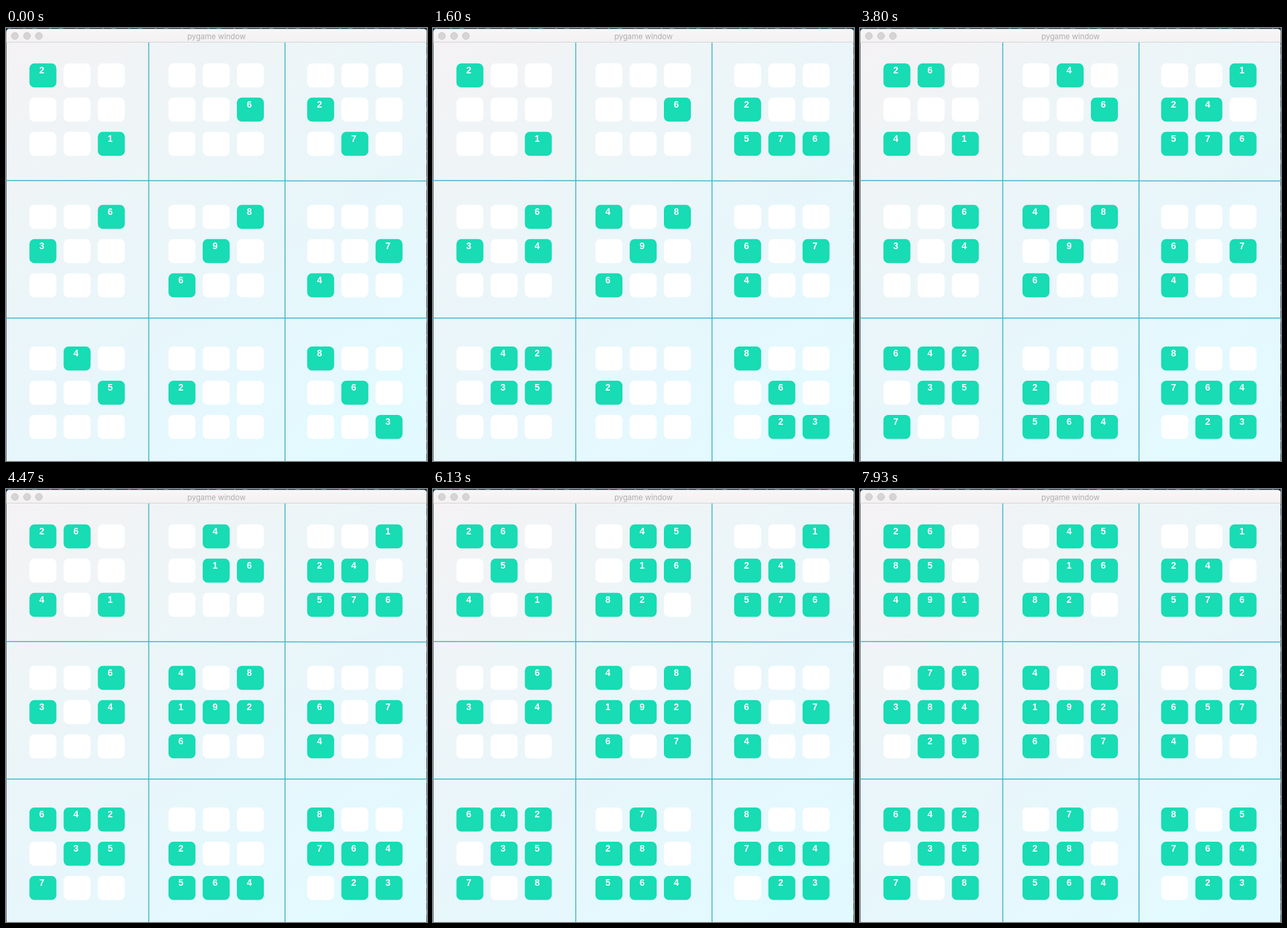
An HTML page that plays this animation: 640x658 px, repeating every 8 s.

```html
<!DOCTYPE html>
<html lang="en">
<head>
<meta charset="utf-8">
<title>Sudoku solver</title>
<style>
  html, body { margin: 0; width: 100%; height: 100%; overflow: hidden; background: #0d2433; }
  svg { display: block; width: 640px; height: 658px; }
  .title { font: 11.5px Inter, sans-serif; fill: #b0adaf; text-anchor: middle; }
  .digit { font: bold 14px "Liberation Sans", Arial, sans-serif; fill: #fff; text-anchor: middle; }
</style>
</head>
<body>
<svg id="stage" viewBox="0 0 640 658" xmlns="http://www.w3.org/2000/svg">
  <defs>
    <linearGradient id="sky" gradientUnits="userSpaceOnUse" x1="60" y1="0" x2="500" y2="658">
      <stop offset="0" stop-color="#f4f2f4"/>
      <stop offset=".3" stop-color="#edf5f7"/>
      <stop offset=".6" stop-color="#e8f6fb"/>
      <stop offset="1" stop-color="#e2faff"/>
    </linearGradient>
    <linearGradient id="bar" x1="0" y1="0" x2="0" y2="1">
      <stop offset="0" stop-color="#f8f6f7"/>
      <stop offset="1" stop-color="#f3f1f2"/>
    </linearGradient>
  </defs>
  <rect width="640" height="658" fill="#0d2433"/>
  <path d="M0 .5H640M639.5 0V658" stroke="#2f7188" stroke-dasharray="7 19 3 11"/>
  <path d="M.6 658V6Q.6 1.5 5 1.5H635Q639.3 1.5 639.3 6V658Z" fill="url(#sky)"/>
  <path d="M.6 22V6Q.6 1.5 5 1.5H635Q639.3 1.5 639.3 6V22Z" fill="url(#bar)"/>
  <path d="M.6 21.5H639.3" stroke="#d6d5d7"/>
  <g fill="#d6d4d5" stroke="#c6c4c5" stroke-width=".8">
    <circle cx="13.5" cy="12" r="5.3"/>
    <circle cx="32" cy="12" r="5.3"/>
    <circle cx="50" cy="12" r="5.3"/>
  </g>
  <text class="title" x="320" y="16.6">pygame window</text>
  <path d="M217 22V658M424.2 22V658M0 231.8L640 232.6M0 440.8H640" fill="none" stroke="#46b7cc" stroke-width="1.5"/>
  <g id="board"></g>
</svg>
<script>
const NS = "http://www.w3.org/2000/svg";
const board = document.getElementById("board");
const LOOP = 8000, FIRST = 50, STEP = 197;
const boxX = [35.6, 247, 457.8], boxY = [53.8, 268.8, 484];

const givens = [
  "2........", ".....62..", "..1....7.",
  "..6..8...", "3...9...7", "...6..4..",
  ".4....8..", "..52...6.", "........3"
];
// Each move is row, column, digit, in solving order.
const moves = (
  "466 334 424 622 872 286 713 265 " +
  "016 606 081 767 784 807 846 " +
  "854 835 174 204 044 " +
  "141 431 452 557 055 115 748 " +
  "242 238 647 828 418 317 529 219 475 " +
  "382 512 685 108"
).split(" ");

function add(name, attrs) {
  const el = document.createElementNS(NS, name);
  for (const key in attrs) el.setAttribute(key, attrs[key]);
  return board.appendChild(el);
}

const cells = givens.map((line, row) => [...line].map((digit, col) => {
  const x = boxX[Math.floor(col / 3)] + col % 3 * 52;
  const y = boxY[Math.floor(row / 3)] + row % 3 * 52;
  return {
    given: digit === "." ? "" : digit,
    tile: add("rect", { x, y, width: 41, height: 36.4, rx: 7.5 }),
    label: add("text", { x: x + 18.8, y: y + 15, class: "digit" })
  };
}));

function paint(cell, digit) {
  cell.tile.setAttribute("fill", digit ? "#17dcb4" : "#fff");
  cell.label.textContent = digit;
}

let shown = -1;
function render(time) {
  const count = Math.min(moves.length, Math.max(0, Math.floor((time - FIRST) / STEP) + 1));
  if (count === shown) return;
  shown = count;
  cells.flat().forEach(cell => paint(cell, cell.given));
  for (const [row, col, digit] of moves.slice(0, count)) paint(cells[row][col], digit);
}

const start = performance.now();
function tick() {
  render((performance.now() - start) % LOOP);
  requestAnimationFrame(tick);
}
render(0);
requestAnimationFrame(tick);
</script>
</body>
</html>
```
